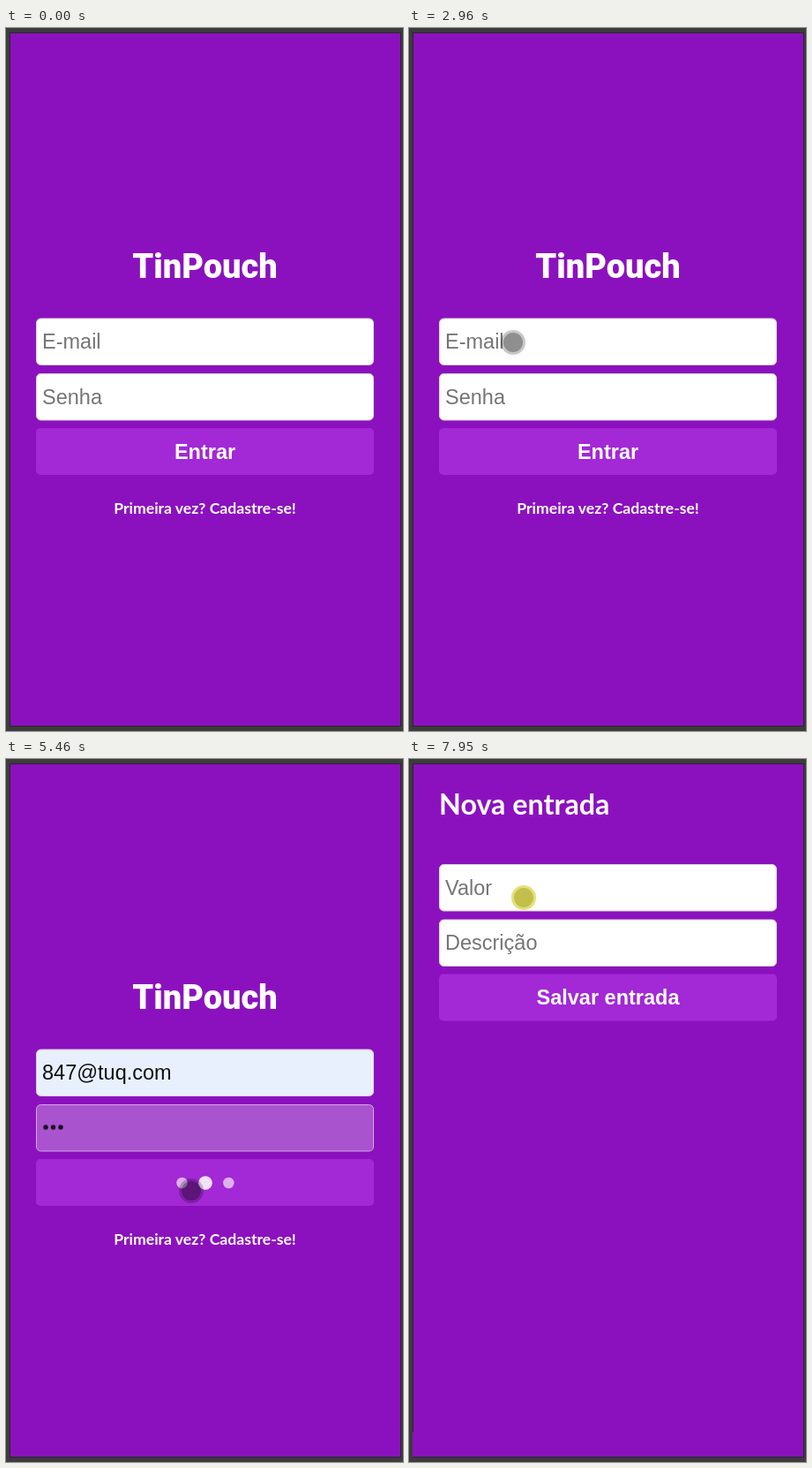
An HTML page that plays this animation: 450 by 796 pixels, repeating every 8 s.

```html
<!DOCTYPE html>
<html lang="pt-BR">
<head>
<meta charset="utf-8">
<title>TinPouch</title>
<style>
html, body { margin: 0; height: 100%; overflow: hidden; background: #3c3c3c; }
svg { display: block; width: 100%; height: 100%; }
text { fill: #fff; white-space: pre; }
.logo { font: 900 38px Roboto, sans-serif; }
.field { font: 23.5px "Liberation Sans", Arial, sans-serif; fill: #757575; }
.typed { fill: #111; }
.button { font: bold 23.5px "Liberation Sans", Arial, sans-serif; }
.link { font: bold 17.6px Lato, sans-serif; }
.head { font: bold 32.3px Lato, sans-serif; }
.card { font: bold 21.3px Lato, sans-serif; }
.empty { font: 25px Lato, sans-serif; fill: #868686; }
.menu { font: 14.2px "Open Sans", sans-serif; }
.hint { font-size: 13px; fill: #b5b6b3; }
.mail { font-weight: 600; font-size: 14.5px; }
.mid { text-anchor: middle; }
.line { fill: none; stroke: #fff; stroke-width: 2; stroke-linecap: round; stroke-linejoin: round; }
</style>
</head>
<body>
<svg id="stage" viewBox="0 0 450 796"></svg>
<script>
const LOOP = 8000, MID = 225.5, MAIL = "847@tuq.com";
const stage = document.getElementById("stage");

// Visible during the [from, to) pairs in `times`
const during = (times, body) => `<g data-on="${times}">${body}</g>`;
const text = (cls, x, y, s) => `<text class="${cls}" x="${x}" y="${y}">${s}</text>`;
const centered = (cls, y, s) => text(cls + " mid", MID, y, s);
const rect = (x, y, w, h, fill, r = 0, more = "") =>
  `<rect x="${x}" y="${y}" width="${w}" height="${h}" rx="${r}" fill="${fill}" ${more}/>`;
const box = (y, fill = "#fff", edge = "#d8d3dc") =>
  rect(34.5, y + .5, 382, 52.5, fill, 5, `stroke="${edge}"`);
const input = (y, label) => box(y) + text("field", 41, y + 34.5, label);
const button = (y, label) =>
  rect(34, y, 383, 53, "#a328d6", 5) + centered("button", y + 34.8, label);
const focus = (y, fill) =>
  rect(33.5, y - .5, 384, 54.5, "#fff", 6) +
  rect(35, y + 1, 381, 51.5, fill, 5, 'stroke="#101010" stroke-width="2"');
const caret = (x, y) => rect(x, y, 1.5, 26, "#111");
const pins = n => [45, 53.5, 62].slice(0, n)
  .map(x => `<circle cx="${x}" cy="417" r="2.7" fill="#16041e"/>`).join("");
const path = (d, more = "") => `<path class="line" d="${d}" ${more}/>`;

const menu =
  rect(34.5, 405.5, 409, 150, "#484a46", 4, 'stroke="#2e302d"') +
  path("M37 555.5H441", 'style="stroke:#c9c9c6;stroke-width:1"') +
  text("menu hint", 50, 433, "Type '/' to search from your saved info") +
  path("M419.5 423l10 10M429.5 423l-10 10", 'style="stroke:#ddd;stroke-width:1.3"') +
  text("menu mail", 51, 478, MAIL) +
  rect(35, 502, 408, 1, "#6a6c67") +
  `<g style="stroke-width:1.4"><circle class="line" cx="57" cy="525.5" r="3.8" style="stroke-width:1.4"/>` +
  path("M57 538C50 538 50 532 52 532H57", 'style="stroke-width:1.4"') +
  rect(58, 530, 10, 8.5, "#fff", 1.5) + path("M60.5 533h5M60.5 535.7h5",
    'style="stroke:#484a46;stroke-width:1"') + "</g>" +
  text("menu", 83.5, 536, "Manage personal info");

const login =
  centered("logo", 283, "TinPouch") +
  during("0 3090", input(328.5, "E-mail")) +
  during("3090 3920", focus(328.5, "#fff") + text("field", 41, 363, "E-mail") + caret(41, 342)) +
  during("3920 4250", focus(328.5, "#e8f0fe") + caret(189, 342)) +
  during("4250 8000", box(328.5, "#e8f0fe")) +
  during("3920 8000", text("field typed", 41, 363, MAIL)) +
  during("0 4250", input(391, "Senha")) +
  during("4250 5170", focus(391, "#fff")) +
  during("4250 4520", text("field", 41, 425.5, "Senha") + caret(41, 404)) +
  during("5170 8000", box(391, "#a953cf", "#d3a6e5")) +
  during("4520 4660", pins(1) + caret(49, 404)) +
  during("4660 4800", pins(2) + caret(57.5, 404)) +
  during("4800 8000", pins(3)) +
  during("4800 5170", caret(66, 404)) +
  during("0 5170", button(453, "Entrar")) +
  during("5170 6050", button(453, "") +
    [199.5, 226, 252.3].map(x => `<circle class="dot" cx="${x}" cy="480" fill="#fff"/>`).join("")) +
  centered("link", 550, "Primeira vez? Cadastre-se!") +
  during("3090 3920", menu);

const signup =
  centered("logo", 223, "TinPouch") +
  ["Nome", "E-mail", "Senha", "Confirme a senha"]
    .map((label, i) => input(266 + i * 62.5, label)).join("") +
  button(515.5, "Cadastrar") +
  centered("link", 612, "Já tem uma conta? Entre agora!");

const card = (x, word) =>
  rect(x, 634, 182.5, 135, "#a328d6", 5) +
  `<circle class="line" cx="${x + 24.7}" cy="661" r="10"/>` +
  path(`M${x + 20.2} 661h9M${x + 24.7} 656.5v9`) +
  text("card", x + 11.5, 728, "Nova") + text("card", x + 11.5, 751, word);

const home =
  rect(445, 6, 1, 255, "#a03fcb") + rect(445, 769, 1, 21, "#a03fcb") +
  text("head", 34, 56, "Olá, Renato") +
  path("M406 41v-2.5q0-2.5-2.5-2.5H392.500q-2.500 0-2.500 2.500v15q0 2.500 2.500 2.500h11q2.500 0 2.500-2.500V51" +
    "M397 46H414M409.500 41.500L414 46l-4.500 4.500") +
  rect(34, 95, 383, 524, "#fff", 5) +
  centered("empty", 358, "Não há registros de") +
  centered("empty", 385, "entrada ou saída") +
  card(34, "entrada") + card(235, "saída");

const entry =
  text("head", 34, 63, "Nova entrada") +
  input(119, "Valor") + input(181.5, "Descrição") +
  button(243.5, "Salvar entrada");

stage.innerHTML =
  rect(0, 0, 450, 796, "#3c3c3c") +
  rect(4.5, 5.5, 443, 785, "#8c11be", 0, 'stroke="#2b2530"') +
  during("6050 8000", rect(4, 762, 1, 28, "#8c11be")) +
  during("0 1080 2220 6050", login) +
  during("1080 2220", signup) +
  during("6050 7130", home) +
  during("7130 8000", entry) +
  `<g id="pointer">` +
  during("70 3090 4250 8000", '<circle id="rim" r="14"/><circle id="core" r="11"/>') +
  during("3090 4250", '<path d="M0 0V16l3.700-3.500 2.600 6 2.500-1.100-2.600-5.800H11Z" fill="#fff" stroke="#111"/>') +
  `</g>`;

// Pointer stops: time, x, y
const stops = [
  [70, 389, 751], [750, 220, 544], [1560, 220, 544], [2020, 207, 607], [2290, 207, 607],
  [2960, 118, 356], [3160, 118, 356], [3570, 107, 441], [3840, 108, 470], [3920, 108, 470],
  [4060, 121, 425], [4850, 121, 425], [5140, 209, 471], [5320, 210, 489], [5900, 210, 489],
  [6050, 203, 481], [6250, 203, 481], [6600, 95, 691], [7390, 94, 690], [7950, 130, 157]
];

function pointerAt(t) {
  const i = stops.findIndex(s => s[0] > t);
  if (i < 1) return (i ? stops[stops.length - 1] : stops[0]).slice(1);
  const [t0, x0, y0] = stops[i - 1], [t1, x1, y1] = stops[i];
  const u = (t - t0) / (t1 - t0), k = u * u * (3 - 2 * u);
  return [x0 + (x1 - x0) * k, y0 + (y1 - y0) * k];
}

const timed = [...stage.querySelectorAll("[data-on]")]
  .map(el => ({ el, times: el.dataset.on.split(" ").map(Number) }));
const dots = [...stage.querySelectorAll(".dot")];
const pointer = document.getElementById("pointer");
const rim = document.getElementById("rim"), core = document.getElementById("core");

function draw() {
  const t = performance.now() % LOOP;
  for (const { el, times } of timed) {
    // An odd count of passed marks means inside a pair
    el.style.display = times.filter(m => m <= t).length % 2 ? "" : "none";
  }

  const [x, y] = pointerAt(t);
  pointer.setAttribute("transform", `translate(${x} ${y})`);
  const yellow = t > 7390 && y < 172;
  rim.setAttribute("fill", yellow ? "#e3e078" : "rgba(0,0,0,.22)");
  core.setAttribute("fill", yellow ? "#c1c04c" : "rgba(0,0,0,.28)");

  const wave = Math.abs(((t - 5170) / 400 % 2 + 2) % 2 - 1);
  dots.forEach((dot, i) => {
    const k = i === 1 ? 1 - wave : wave;
    dot.setAttribute("r", 5.3 + 3.5 * k);
    dot.setAttribute("fill-opacity", .5 + .5 * k);
  });
  requestAnimationFrame(draw);
}
draw();
</script>
</body>
</html>
```
